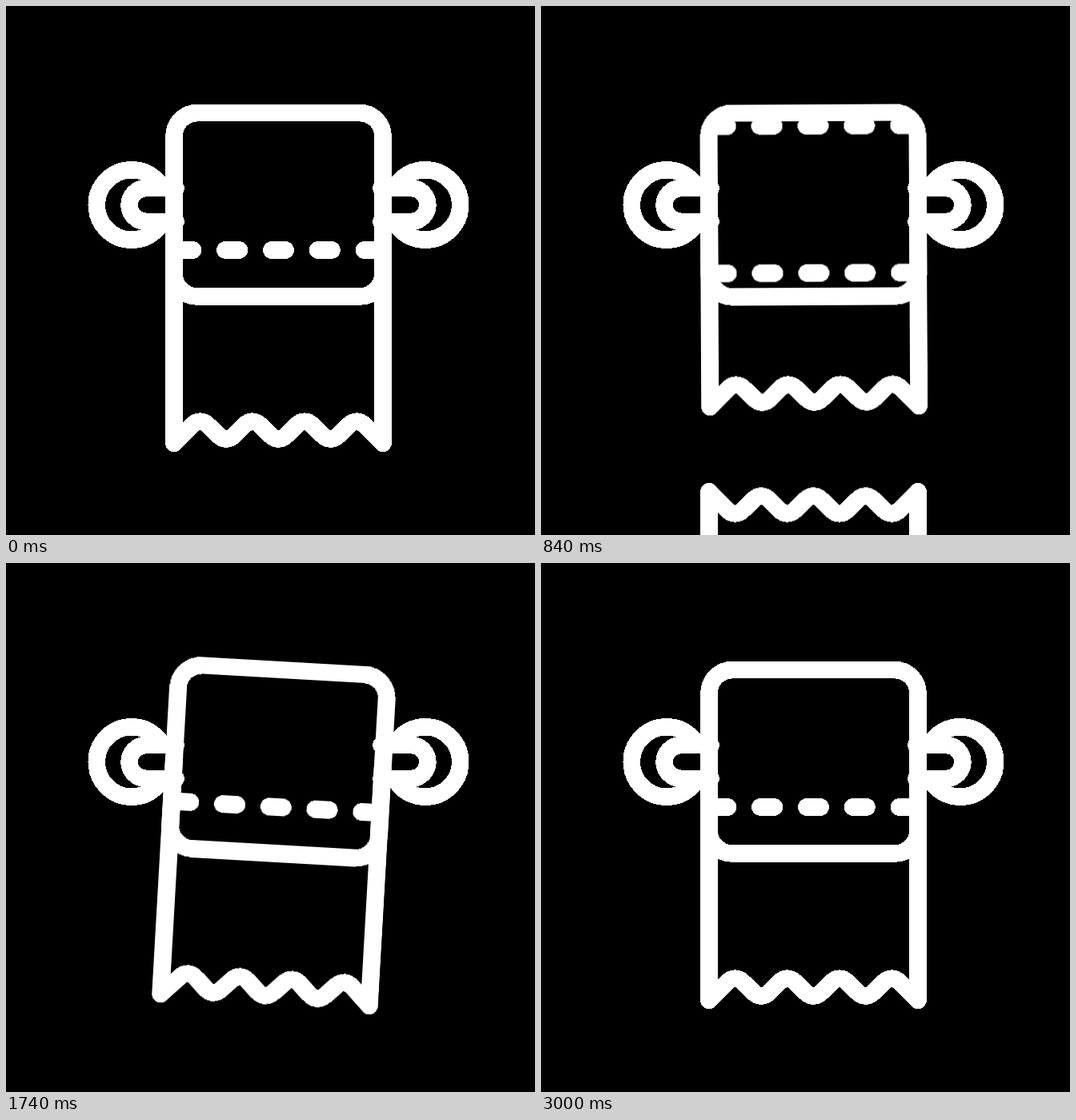
An HTML page that plays this animation: 661 px wide and 661 px high, repeating every 3.33 s.

```html
<!DOCTYPE html>
<html lang="en">
<head>
<meta charset="utf-8">
<title>Paper roll</title>
<style>
  html, body { margin: 0; width: 100%; height: 100%; overflow: hidden; background: #000; }
  svg { display: block; width: 100%; height: 100%; shape-rendering: crispEdges; }
  .lines { fill: none; stroke: #fff; stroke-width: 21.6; stroke-linecap: round; stroke-linejoin: round; }
  .dash { stroke-dasharray: 17.4 40.4; }

  .roll, .sheet, .dashes, .piece {
    animation: 3330ms cubic-bezier(.333, 0, .667, 1) infinite;
  }
  .roll { animation-name: swing; transform-origin: 340.5px 248.5px; }
  .sheet { animation-name: pull; }
  .dashes { animation-name: unroll; }
  .piece { animation-name: fall; }

  /* damped swing, 450 ms per half wave */
  @keyframes swing {
    0%, 23.423% { transform: rotate(0deg); }
    36.036% { transform: rotate(-5deg); }
    49.55% { transform: rotate(4deg); }
    63.063% { transform: rotate(-3deg); }
    76.577% { transform: rotate(2deg); }
    90.09%, 100% { transform: rotate(0deg); }
  }
  /* pulled down, torn off short, then fed out again */
  @keyframes pull {
    0% { transform: translateY(0); }
    20.6%, 21.62% { transform: translateY(135.4px); }
    21.622% { transform: translateY(-54.6px); }
    36.2%, 100% { transform: translateY(0); }
  }
  @keyframes unroll {
    0% { transform: translateY(0); }
    20.6%, 21.622% { transform: translateY(184px); }
    36.2%, 100% { transform: translateY(368px); }
  }
  @keyframes fall {
    0%, 21.62% { transform: translateY(726px); }
    21.622% { transform: translateY(0); }
    36.036%, 100% { transform: translateY(726px); }
  }
</style>
</head>
<body>
<svg viewBox="0 0 661 661">
  <defs>
    <path id="wave" d="M210 546.4 L231.9 524.5
      q10.7 -10.7 21.4 0 l11.2 11.2 q10.7 10.7 21.4 0 l11.2 -11.2
      q10.7 -10.7 21.4 0 l11.2 11.2 q10.7 10.7 21.4 0 l11.2 -11.2
      q10.7 -10.7 21.4 0 l11.2 11.2 q10.7 10.7 21.4 0 l11.2 -11.2
      q10.7 -10.7 21.4 0 L471 546.4"/>
    <g id="holder">
      <circle cx="157" cy="248.5" r="43.7"/>
      <path fill="#000" d="M212 227.6 H175 a20.9 20.9 0 0 0 0 41.8 H212"/>
    </g>
    <clipPath id="below"><rect y="248" width="661" height="700"/></clipPath>
    <clipPath id="face"><rect x="210" y="133.6" width="261" height="229.4" rx="29"/></clipPath>
  </defs>

  <g class="lines">
    <use href="#holder"/>
    <use href="#holder" transform="translate(681) scale(-1 1)"/>

    <g class="piece">
      <use href="#wave" transform="translate(0 1038.2) scale(1 -1)"/>
      <use href="#wave" y="135.4"/>
      <path d="M210 491.8 V681.8 M471 491.8 V681.8"/>
    </g>

    <g class="roll">
      <g clip-path="url(#below)">
        <g class="sheet">
          <path d="M210 100 V546.4 M471 100 V546.4"/>
          <use href="#wave"/>
        </g>
      </g>
      <g clip-path="url(#face)">
        <g class="dashes">
          <path class="dash" d="M216.2 305 H464.8"/>
          <path class="dash" d="M216.2 121 H464.8"/>
          <path class="dash" d="M216.2 -63 H464.8"/>
        </g>
      </g>
      <rect x="210" y="133.6" width="261" height="229.4" rx="29"/>
    </g>
  </g>
</svg>
</body>
</html>
```
